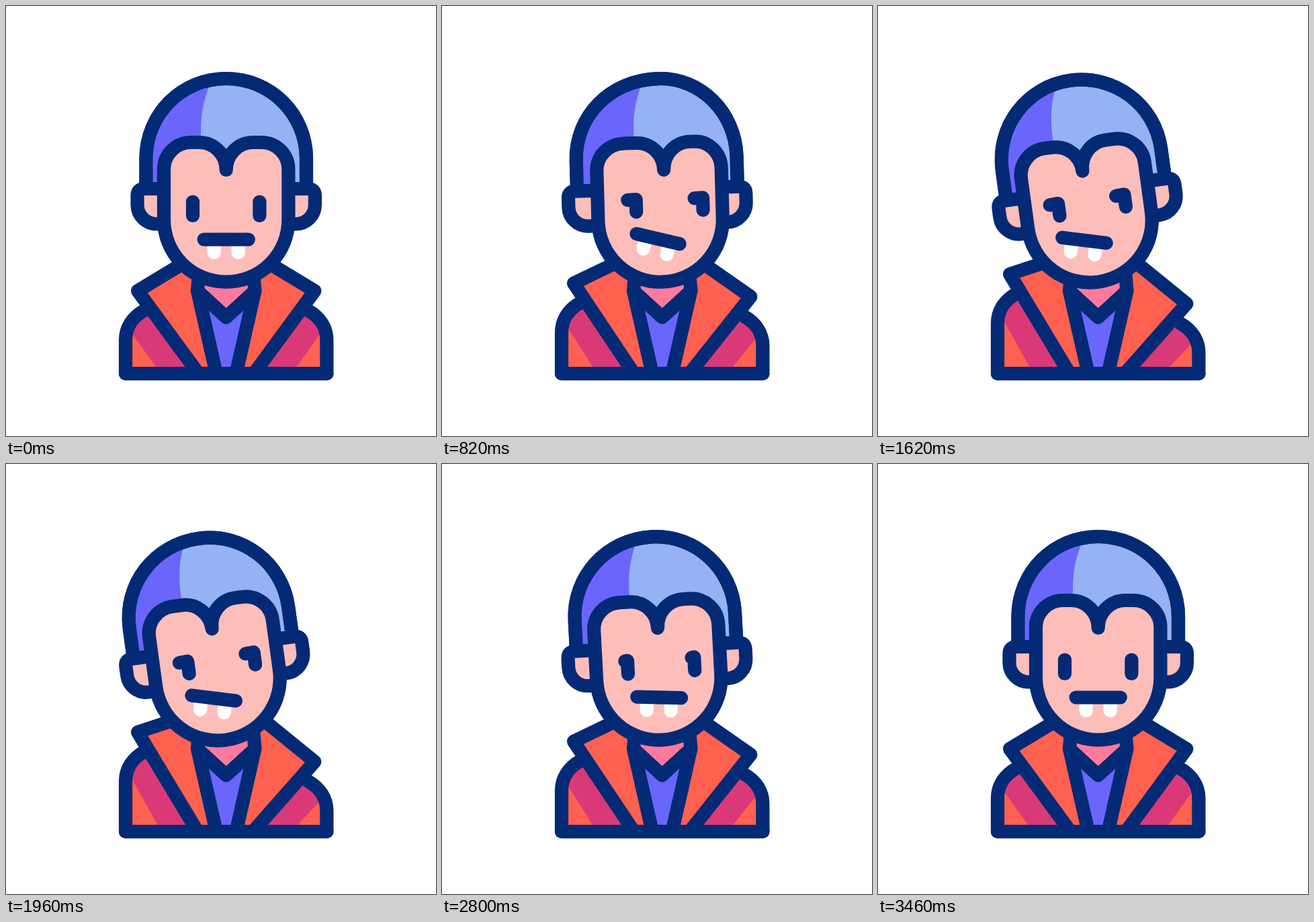
Recreate the animation shown at these times as an HTML page with a canvas. Size 640x640 px, loop 3.6 s.

```html
<!DOCTYPE html>
<html lang="en">
<head>
<meta charset="utf-8">
<title>Vampire</title>
<style>
  html, body { margin: 0; width: 100%; height: 100%; overflow: hidden; background: #fff; }
  canvas { display: block; width: 640px; height: 640px; }
</style>
</head>
<body>
<canvas id="stage" width="640" height="640"></canvas>
<script>
const ctx = document.getElementById('stage').getContext('2d');
const LOOP = 3600;
const MID = 327.7, CHIN = 411, BASE = 547.2;
const NAVY = '#042a76', SKIN = '#fdbeb9', ROSE = '#fc7b9d', ORANGE = '#ff6150';
const MAGENTA = '#d93a77', PURPLE = '#6a66fb', BLUE = '#94b2f4', WHITE = '#fff';

const clamp = (v, min, max) => Math.min(max, Math.max(min, v));
const progress = (t, start, end) => clamp((t - start) / (end - start), 0, 1);
const ease = u => (1 - Math.cos(Math.PI * u)) / 2;
const rad = degrees => degrees * Math.PI / 180;

// Eases up to 1, holds, then eases back to 0.
function hold(t, start, full, release, end) {
  return ease(progress(t, start, full)) - ease(progress(t, release, end));
}

// The head shakes from side to side, then settles.
function turnAt(t) {
  const firstPeak = 700, period = 720, lastPeak = firstPeak + 2 * period;
  const phase = (clamp(t, firstPeak, lastPeak) - firstPeak) / period;
  const swing = 1.5 + 11.5 * Math.cos(2 * Math.PI * phase);
  const settle = (1 - progress(t, lastPeak - 40, 3300)) ** 2;
  return swing * ease(progress(t, 300, firstPeak)) * settle;
}

function fill(path, color) {
  ctx.fillStyle = color;
  ctx.fill(path);
}

function stroke(path, color = NAVY) {
  ctx.strokeStyle = color;
  ctx.stroke(path);
}

function shape(d, color) {
  const path = new Path2D(d);
  fill(path, color);
  stroke(path);
  return path;
}

function line(d, color) {
  stroke(new Path2D(d), color);
}

function mirrored(draw) {
  ctx.save();
  ctx.translate(2 * MID, 0);
  ctx.scale(-1, 1);
  draw();
  ctx.restore();
}

function drawSide(lift) {
  const shoulder = `M178 ${BASE} V${497 + lift} C178 ${479 + lift} 188 ${463 + lift} 206 ${453 + lift}`;
  const sleeve = new Path2D(`${shoulder} L279 537 V${BASE} Z`);
  const foot = 279 + 830 / (113 - lift);
  const lapel = `M287 369 L196 ${424 + lift} L${foot} 547`;

  fill(sleeve, ORANGE);
  ctx.save();
  ctx.clip(sleeve);
  fill(new Path2D(`M183 ${481 + lift * 0.8} L${223 - lift * 0.1} 537 H300 V400 H183 Z`), MAGENTA);
  ctx.restore();
  line(shoulder);

  fill(new Path2D(`${lapel} H312 L285 424 L287 400 Z`), ORANGE);
  line(lapel);
  line('M287 400 L285 424 L312.5 545');
}

function drawBody(lean) {
  fill(new Path2D(`M285 424 L${MID} 463 L370.4 424 L343 547 H312 Z`), PURPLE);
  fill(new Path2D(`M285 400 H370.4 V424 L${MID} 463 L285 424 Z`), ROSE);
  drawSide(-25 * lean);
  mirrored(() => drawSide(19 * lean));
  line(`M285 424 L${MID} 463.3 L370.4 424`);
  line(`M178 ${BASE} H477.4`);
}

function drawHair(turn) {
  const top = MID + 0.4 * turn;
  const left = 208.5 - 0.5 * turn, right = 447 - 0.45 * turn;
  const leftPull = top - 66 - 0.9 * turn, rightPull = top + 66 - 0.5 * turn;
  const outline =
    `M${left} 272 V227 C${left} 161 ${leftPull} 108 ${top} 108 ` +
    `C${rightPull} 108 ${right} 161 ${right} 227 V272`;
  const hair = shape(outline, BLUE);

  ctx.save();
  ctx.clip(hair);
  ctx.translate(0.2 * turn, 0);
  fill(new Path2D('M309 105 C294 136 288 162 290.5 205 V280 H180 V105 Z'), PURPLE);
  ctx.restore();
  line(outline);
}

function drawEars(turn) {
  const ear = () => shape(
    'M240 272 H206 Q195.5 272 195.5 282 V296 A28.5 28.5 0 0 0 224 324.5 H240', SKIN);
  ctx.save();
  ctx.translate(-0.55 * turn, 0);
  ear();
  mirrored(ear);
  ctx.restore();
}

function drawFace(turn) {
  const notch = MID + turn;
  const leftTop = 275 + turn * 0.3, rightTop = 380.4 + turn * 0.3;
  shape(
    `M${notch} 244 C${notch} 221 ${notch - 18} 203 ${notch - 40} 203 H${leftTop} ` +
    `C253 203 235 221 235 243 V318 A92.7 92.7 0 0 0 420.4 318 V243 ` +
    `C420.4 221 402.4 203 ${rightTop} 203 H${notch + 40} ` +
    `C${notch + 18} 203 ${notch} 221 ${notch} 244 Z`, SKIN);
}

function drawFeatures(turn, mood) {
  const look = turn + 7 * mood;
  const top = 291.5 - 4.5 * mood, bottom = 312 - 6.5 * mood;
  for (const side of [-1, 1]) {
    const x = MID + side * 49.7 + look;
    line(`M${x - 12.5 * mood} ${top + 0.5} L${x} ${top} V${bottom}`);
  }

  ctx.save();
  ctx.translate(MID + turn - 11.5 * mood, 347.5 - mood);
  ctx.rotate(rad(14.8 * mood));
  for (const side of [-1, 1]) line(`M${side * 18} 0 V19.5`, WHITE);
  line('M-33 0 H33');
  ctx.restore();
}

function draw(t) {
  const turn = turnAt(t);
  const tilt = 7.8 * hold(t, 480, 1620, 2140, 3300);
  const lean = hold(t, 200, 1520, 2000, 3500);
  const mood = hold(t, 140, 800, 2080, 3220);

  ctx.fillStyle = WHITE;
  ctx.fillRect(0, 0, 640, 640);
  ctx.lineWidth = 20.2;
  ctx.lineCap = ctx.lineJoin = 'round';

  drawBody(lean);

  ctx.save();
  ctx.translate(MID, CHIN);
  ctx.rotate(rad(-tilt));
  ctx.translate(-MID, -CHIN);
  drawHair(turn);
  drawEars(turn);
  drawFace(turn);
  drawFeatures(turn, mood);
  ctx.restore();
}

function tick() {
  draw(performance.now() % LOOP);
  requestAnimationFrame(tick);
}
tick();
</script>
</body>
</html>
```
